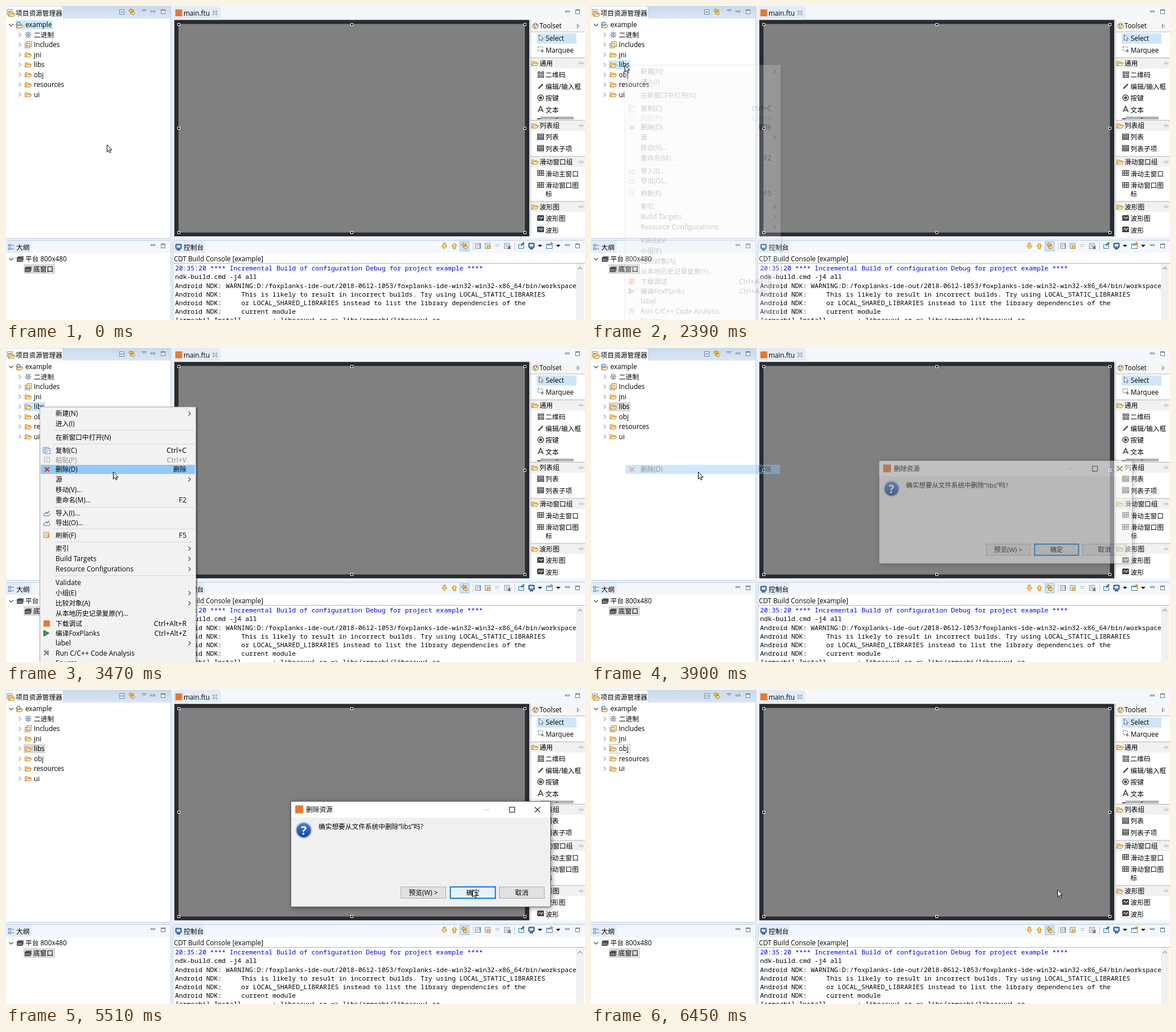
An HTML page that plays this animation: 1017x551 px, repeating every 7.32 s.

```html
<!DOCTYPE html>
<html lang="zh">
<head>
<meta charset="utf-8">
<style>
html, body { margin: 0; width: 100%; height: 100%; overflow: hidden; background: #e8eef8; }
svg { display: block; }
text { font: 11.7px 'Open Sans', 'Noto Sans CJK SC', 'Noto Sans CJK JP', 'Noto Sans CJK', sans-serif; white-space: pre; }
.mono { font: 11.42px 'Noto Sans Mono', 'DejaVu Sans Mono', monospace; }
.latin { font-size: 12px; }
.key { font-size: 12.3px; }
</style>
</head>
<body>
<script>
// Shape helpers; text is placed by its vertical centre
const text = (x, y, s, attrs = '') => `<text x="${x}" y="${y + 4.2}" ${attrs}>${s}</text>`;
const rect = (x, y, w, h, fill, attrs = '') => `<rect x="${x}" y="${y}" width="${w}" height="${h}" fill="${fill}" ${attrs}/>`;
const box = (x, y, w, h, line, fill = 'none', attrs = '') => rect(x + .5, y + .5, w - 1, h - 1, fill, `stroke="${line}" ${attrs}`);
const line = (d, color, attrs = '') => `<path d="${d}" fill="none" stroke="${color}" ${attrs}/>`;
const shape = (d, fill, attrs = '') => `<path d="${d}" fill="${fill}" ${attrs}/>`;
const group = (id, s, attrs = '') => `<g id="${id}" ${attrs}>${s}</g>`;
const at = (x, y, s) => `<g transform="translate(${x} ${y})">${s}</g>`;
const list = (items, draw) => items.map(i => draw(...i)).join('');

// Icons, drawn around their centre
const folder = (x, y) => at(x, y,
  shape('M-5.5 4V-3.5H-1.5L-.5-2H3.5V0H5.5L3.5 4Z', '#f6d58a', 'stroke="#c08a35"') +
  shape('M-5 4L-2.5 0H6L3.5 4Z', '#ffefbd', 'stroke="#c08a35"'));
const right = (x, y, c = '#a0a0a0') => line(`M${x - 1.5} ${y - 3.5}l3.5 3.5-3.5 3.5`, c, 'stroke-width="1.1"');
const down = (x, y) => line(`M${x - 3.5} ${y - 1.5}l3.5 3.5 3.5-3.5`, '#404040', 'stroke-width="1.2"');
const minimise = (x, y) => box(x - 4, y - 1, 8, 3, '#737b87', '#fff');
const maximise = (x, y) => box(x - 4, y - 4, 8, 8, '#737b87', '#fff') + rect(x - 4, y - 4, 8, 2, '#737b87');
const arrows = (x, y) => at(x, y,
  shape('M-5.5-2L-2-5.5V-3.5H3V-.5H-2V1.5Z', '#f4c75c', 'stroke="#b67b16"') +
  shape('M5.5 2.5L2-1V1H-2V4H2V6Z', '#fde5a0', 'stroke="#b67b16"'));
const arrow = (x, y, flip) => `<g transform="translate(${x} ${y}) scale(1 ${flip})">` +
  shape('M-2-5H2V0H4.5L0 5-4.5 0H-2Z', '#fbd76f', 'stroke="#bb8518"') + '</g>';
const monitor = (x, y) => box(x - 5, y - 5, 10, 8, '#24528e', '#cfe6fb', 'stroke-width="2" rx="1"') + rect(x - 3, y + 4, 6, 2, '#24528e');
const windows = (x, y) => rect(x - 4, y - 5, 10, 8, '#777') + box(x - 6, y - 3, 10, 8, '#444', '#777') + rect(x - 6, y - 3, 10, 2, '#333');
const sheet = (x, y, c = '#8b9099') => box(x - 5, y - 5, 10, 10, c, '#f5f6f8') + line(`M${x - 3} ${y - 1.5}h6m-6 3h4`, c);
const caret = (x, y) => shape(`M${x - 4} ${y - 2}h8l-4 4Z`, '#111');
const badge = (x, y, s) => rect(x - s / 2, y - s / 2, s, s, '#e8792f');
const cross = (x, y, r, c, w) => line(`M${x - r} ${y - r}l${2 * r} ${2 * r}m0-${2 * r}l-${2 * r} ${2 * r}`, c, `stroke-width="${w}"`);
const rows = (x, y) => box(x - 6, y - 5, 12, 11, '#444', '#ccc') + line(`M${x - 6} ${y - 2}h12m-12 3h12m-12 2.5h12`, '#444', 'stroke-width="1.4"');
const slides = (x, y) => box(x - 6, y - 5, 12, 10, '#444', '#ccc') + line(`M${x - 6} ${y}h12M${x - 2} ${y - 5}v10M${x + 2} ${y - 5}v10`, '#444', 'stroke-width="1.2"');
const wave = (x, y) => rect(x - 6, y - 5, 12, 10, '#444', 'rx="1.5"') + line(`M${x - 4} ${y + 1}l2.5-3 2.5 4 2-4 1.5 2`, '#fff');

const sidePanels = () =>
  box(-1, -1, 291, 409, '#c3d0e4', '#fff', 'rx="2"') + rect(0, 0, 289, 22, 'url(#active)') +
  shape('M0 0H95Q101 0 101 6V23H0Z', '#fafcff', 'stroke="#b9c8de"') + rect(0, 22, 289, 2, '#fff') +
  sheet(7, 11, '#b48a3c') + folder(10, 14) + text(17, 12.5, '项目资源管理器') +
  box(199, 6, 9, 9, '#5c87b8', '#e5f0fb') + line('M201 10.5h5', '#24528e') + arrows(221, 10) +
  line('M239 6.5h7l-3.5 3.5Z', '#737b87') + minimise(258, 9) + maximise(276, 10) +
  box(-1, 411, 291, 145, '#c3d0e4', '#fff', 'rx="2"') + rect(0, 412, 289, 21, '#f4f7fc') +
  shape('M0 412H39Q45 412 45 418V433H0Z', '#e3ecf8') +
  line('M4.5 418.5h4v3h-4Zm0 6h4v3h-4ZM10 420h4m-4 6h4', '#3c77b3') + text(18, 424, '大纲') +
  minimise(258, 419) + maximise(276, 421) +
  down(9, 444) + windows(25, 444) + text(34, 444, '平台 800x480') +
  rect(31, 453, 55, 17, '#d9d9d9') + windows(39, 462) + text(48, 462, '底窗口');

const editor = () =>
  rect(293, 0, 724, 408, '#f4f7fc') +
  shape('M295 0H371Q377 0 377 6V22H295Z', '#e3ecf8') + badge(303.5, 12, 12) + text(312, 12.5, 'main.ftu') +
  line('M363.5 8.5h1.5l2 2 2-2h1.5v1.5l-2 2 2 2v1.5h-1.5l-2-2-2 2h-1.5v-1.5l2-2-2-2Z', '#7d8794') +
  minimise(986, 9) + maximise(1004, 10) +
  rect(295.6, 24.4, 623.6, 379.8, '#282b2f') + rect(303, 31.5, 608.5, 366, '#808080') +
  [303, 607, 911].flatMap(x => [32, 214, 397].filter(y => x != 607 || y != 214)
    .map(y => box(x - 2, y - 2, 5, 5, '#fff', '#000'))).join('');

const header = (y, s) => rect(922, y - 10, 95, 19, '#f1f1f1') + rect(922, y - 10, 95, 1, '#b4b4b4') +
  folder(929, y) + text(937, y, s) + line(`M1009 ${y - 2.5}l-2.5 2.5 2.5 2.5m2.5-5l2.5 2.5-2.5 2.5M1008 ${y}h4.5`, '#aaa');

const toolPanel = () =>
  rect(921, 24, 96, 380, '#fff') + rect(921, 24, 1, 380, '#b9bfca') + rect(922, 24, 95, 21, '#f6f6f6') + rect(922, 45, 95, 1, '#bbb') +
  `<circle cx="930" cy="35" r="5" fill="#f0dfb7" stroke="#8f7650"/>` +
  rect(927, 32, 2, 2, '#d33') + rect(931, 32, 2, 2, '#36b') + rect(928, 36, 2, 2, '#393') +
  text(937, 35, 'Toolset') + line('M1003.5 31.5l4 3.5-4 3.5Z', '#777') +
  rect(932, 48, 70, 18, '#cde6fb') + shape('M936.5 50.5v10l2.5-2 2 3 1.5-1-1.5-3h3Z', '#fff', 'stroke="#567"') + text(948, 57, 'Select') +
  line('M934.5 71.5h8v7h-8Z', '#456', 'stroke-dasharray="2 2"') + line('M942 76v6m-3-3h6', '#456') + text(948, 78, 'Marquee') +
  header(100.5, '通用') +
  list([[934, 115], [940, 115], [934, 121], [940, 121]], (x, y) => box(x, y, 5, 5, '#444', '#aaa')) +
  line('M935 145l8-8', '#555', 'stroke-width="2.5"') +
  '<circle cx="939" cy="161" r="5" fill="none" stroke="#444" stroke-width="1.5"/><circle cx="939" cy="161" r="2.6" fill="#444"/>' +
  line('M934.5 186l4.5-10 4.5 10M936 183h6', '#444', 'stroke-width="1.7"') +
  list([[121, '二维码'], [141.5, '编辑/输入框'], [162, '按键'], [182.5, '文本']], (y, s) => text(947.5, y, s)) +
  rect(933, 197, 6, 2, '#555') + rect(939, 194, 58, 5, '#b2b2b2') + shape('M965 196h5l-2.5 2Z', '#444') +
  header(210, '列表组') + header(273.5, '滑动窗口组') + header(352.5, '波形图') +
  list([[rows, 230, '列表'], [rows, 250.5, '列表子项'], [slides, 294.5, '滑动主窗口'], [slides, 315, '滑动窗口图'],
    [wave, 373, '波形图'], [wave, 393.5, '波形']], (icon, y, s) => icon(939, Math.floor(y) - 1) + text(947.5, y, s)) +
  text(947.5, 330, '标');

const logLines = [
  'ndk-build.cmd -j4 all',
  'Android NDK: WARNING:D:/foxplanks-ide-out/2018-0612-1053/foxplanks-ide-win32-win32-x86_64/bin/workspace',
  'Android NDK:     This is likely to result in incorrect builds. Try using LOCAL_STATIC_LIBRARIES',
  'Android NDK:     or LOCAL_SHARED_LIBRARIES instead to list the library dependencies of the',
  'Android NDK:     current module',
  '[armeabi] Install        : libeasyui.so =&gt; libs/armeabi/libeasyui.so'];

const consolePanel = () =>
  box(293, 411, 726, 145, '#c3d0e4', '#fff', 'rx="2"') + rect(294, 412, 723, 21, '#f4f7fc') +
  shape('M294 412H343Q349 412 349 418V433H294Z', '#e3ecf8') + monitor(303, 423) + text(312, 424, '控制台') +
  arrow(770, 421, 1) + arrow(787.5, 421, -1) + box(797, 413, 17, 17, '#90c0ea', '#cde6fb') + arrows(805.5, 421) +
  rect(820, 414, 1, 15, '#c5c9d0') + sheet(829, 421) + rect(832, 416, 2, 10, '#6d91b9') + sheet(846, 421) + box(845, 421, 6, 5, '#b98619', '#fbd76f') +
  line('M859.5 418.5h8m-8 3h6', '#a8b4c4') + sheet(880, 421) + cross(884, 424, 2.5, '#555', 1.5) + rect(893, 414, 1, 15, '#c5c9d0') +
  box(900, 418, 10, 8, '#4a78ab', '#e5f0fb') + line('M905 420l5-5', '#2b8651', 'stroke-width="3"') + monitor(923, 421) + caret(938, 421) +
  box(949, 417, 11, 9, '#4a78ab', '#fff') + rect(949, 417, 11, 3, '#6d9bcf') + line('M958 414v6m-3-3h6', '#d69b22', 'stroke-width="2"') + caret(970, 421) +
  minimise(986, 419) + maximise(1004, 421) +
  text(295, 443.5, 'CDT Build Console [example]') + rect(294, 451, 723, 1, '#aeb4bd') +
  '<g clip-path="url(#log)">' +
  text(297, 460, '20:35:20 **** Incremental Build of configuration Debug for project example ****', 'class="mono" fill="#00f"') +
  logLines.map((s, i) => text(297, 475.2 + 15.2 * i, s, 'class="mono"')).join('') + '</g>' +
  rect(1001, 452, 14, 99, '#f0f0f0') + line('M1004.5 462l3.5-3.5 3.5 3.5', '#999', 'stroke-width="1.3"');

const node = (y, s) => right(24, y) + folder(39, y) + text(49, y, s);
const tree = () =>
  group('rootSel', rect(17, 25, 65, 16, '#cce8ff')) + rect(31, 95, 38, 16, '#cce8ff', 'id="libsSel"') +
  down(9, 33) + folder(24, 34) + box(19, 28, 6, 6, '#3c77b3', '#d8eafb') + text(34, 33, 'example') +
  right(24, 50.5) + line('M39 45v11m-5.5-5.5h11M35 46.5l8 8m0-8l-8 8', '#667c92', 'stroke-width="1.7" stroke-dasharray="3 1"') + text(49, 50.5, '二进制') +
  right(24, 68) + box(36, 62, 9, 10, '#a98643', '#fff5d7') + box(33, 65, 9, 9, '#a98643', '#fff5d7') + line('M36 67v5m0-2h3v2', '#666') + text(49, 68, 'Includes') +
  node(85.5, 'jni') + group('libs', node(103, 'libs')) +
  group('rest', node(120.5, 'obj') + node(138, 'resources') + node(155.5, 'ui')) +
  group('focus', box(32, 95, 37, 16, '#777', 'none', 'stroke-dasharray="1 1"'));

// [centre, label, shortcut]; '>' marks a submenu
const deletion = [213, '删除(D)', '删除'];
const entries = [[115, '新建(N)', '>'], [133, '进入(I)'], [157, '在新窗口中打开(N)'], [180, '复制(C)', 'Ctrl+C'],
  [196.5, '粘贴(P)', 'Ctrl+V'], deletion, [230.5, '源', '>'], [249, '移动(V)...'], [267, '重命名(M)...', 'F2'],
  [290, '导入(I)...'], [307, '导出(O)...'], [328.5, '刷新(F)', 'F5'], [352, '索引', '>'], [370, 'Build Targets', '>'],
  [388, 'Resource Configurations', '>'], [411.5, 'Validate'], [430, '小组(E)', '>'], [448, '比较对象(A)', '>'],
  [466, '从本地历史记录复原(Y)...'], [484, '下载调试', 'Ctrl+Alt+R'], [500.5, '编译FoxPlanks', 'Ctrl+Alt+Z'],
  [518, 'label', '>'], [535.5, 'Run C/C++ Code Analysis'], [553, 'Source']];
const entry = (y, s, key) => {
  const fill = `fill="${s[0] == '粘' ? '#8d8d8d' : '#000'}"`;
  const keyClass = /\w/.test(key) ? 'class="key"' : '';
  return text(87, y, s, fill + (/^\w/.test(s) ? ' class="latin"' : '')) + (key == '>' ? right(322, y, '#444') :
    key ? text(317, y, key, `${fill} ${keyClass} text-anchor="end"`) : '');
};
const deleteIcon = cross(72, 213, 3.7, '#d9402b', 2.6);
const port = y => line(`M66.5 ${y}v4.5h10v-4.5`, '#5e87b5') + line(`M68 ${y + 1}l3-3 2 2 3-4`, '#5e87b5', 'stroke-width="1.5"');
const menu = () =>
  box(59, 103, 275, 470, '#a7a7a7', '#f2f2f2', 'filter="url(#menuShadow)"') +
  rect(61, 205, 271, 16, '#91c9f7', 'id="hover"') +
  [144, 168, 279, 317, 340, 399].map(y => rect(85, y, 246, 1, '#d7d7d7')).join('') +
  list(entries, entry) + deleteIcon +
  sheet(70, 179, '#6d91b9') + sheet(73, 181, '#6d91b9') + sheet(72, 196, '#b5b5b5') + port(290) + port(307) +
  sheet(71, 328, '#b48a3c') + line('M70 333q5 0 4-6', '#e0a030', 'stroke-width="2"') + badge(71.5, 483.5, 11) +
  shape('M66.5 495.5l9 5-9 5Z', '#37a447', 'stroke="#333"') + cross(71, 535, 4, '#4a78ab', 1.8) + line('M69 531l6 4-8 2', '#d98b2b', 'stroke-width="1.6"');

const button = (x, s, id) => group(id, box(x, 345, 80, 21, '#adadad', '#e1e1e1') + text(x + 40, 356, s, 'text-anchor="middle"'));
const dialog = () =>
  box(500, 195, 457, 186, '#666', '#f0f0f0', 'filter="url(#shadow)"') + rect(501, 196, 455, 28, '#fff') +
  badge(515, 209.5, 14) + text(527, 210, '删除资源') +
  line('M840 210h9', '#c4c4c4') + box(884, 205, 10, 10, '#111') + cross(933.5, 210, 4.7, '#111', 1.1) +
  '<circle cx="523" cy="246" r="13.5" fill="url(#ask)" stroke="#b9c3d2" stroke-width="2"/>' +
  text(523, 247, '?', 'fill="#fff" text-anchor="middle" style="font-size:21px;font-weight:700" dy="3"') +
  text(549, 240, '确实想要从文件系统中删除“libs”吗?') +
  button(693, '预览(W) &gt;', 'preview') + button(780, '确定', 'ok') + button(866, '取消', 'cancel');

const gradient = (id, from, to) => `<linearGradient id="${id}" x2="0" y2="1"><stop stop-color="${from}"/><stop offset="1" stop-color="${to}"/></linearGradient>`;
const shadow = (id, d, blur, o) => `<filter id="${id}" x="-10%" y="-10%" width="120%" height="130%"><feDropShadow dx="${d}" dy="${d}" stdDeviation="${blur}" flood-opacity="${o}"/></filter>`;
document.body.innerHTML = '<svg width="1017" height="551"><defs>' +
  gradient('active', '#c9d9ed', '#dae6f5') + gradient('ask', '#4c83d6', '#123f96') +
  shadow('menuShadow', 2, 1.5, .45) + shadow('shadow', 2, 5, .4) +
  '<clipPath id="log"><rect x="294" y="452" width="707" height="99"/></clipPath></defs>' +
  sidePanels() + editor() + toolPanel() + consolePanel() + tree() +
  group('menu', menu()) + group('flash', rect(61, 205, 271, 16, '#91c9f7') + entry(...deletion) + deleteIcon) + group('dialog', dialog()) +
  group('cursor', shape('M.5.5V13L3.3 10.4 5.2 14.6 7.2 13.7 5.3 9.6H9Z', '#fff', 'stroke="#000"')) + '</svg>';

const $ = id => document.getElementById(id);
const show = (id, opacity) => {
  $(id).setAttribute('opacity', opacity);
  $(id).style.display = opacity > 0 ? '' : 'none';
};
const clamp = v => Math.max(0, Math.min(1, v));

// Pointer tip: [time, x, y]
const path = [[430, 177, 243], [1140, 61, 105], [1210, 61, 105], [1330, 59, 103], [2840, 59, 103], [3330, 187, 216],
  [3469, 187, 216], [3470, 188, 217], [3930, 188, 217], [4480, 764, 280], [4740, 804, 338], [5260, 818, 349], [5509, 818, 349], [5510, 819, 350]];
function pointer(t) {
  const i = path.findIndex(k => k[0] > t);
  if (i < 0) return path[path.length - 1].slice(1);
  if (!i) return path[0].slice(1);
  const [t0, x0, y0] = path[i - 1], [t1, x1, y1] = path[i];
  let p = (t - t0) / (t1 - t0);
  if (Math.hypot(x1 - x0, y1 - y0) > 100) p *= p * (3 - 2 * p);
  return [Math.round(x0 + (x1 - x0) * p), Math.round(y0 + (y1 - y0) * p)];
}

function paintButton(id, fill, edge, color, width = 1) {
  const [face, label] = $(id).children;
  face.setAttribute('fill', fill);
  face.setAttribute('stroke', edge);
  face.setAttribute('stroke-width', width);
  label.setAttribute('fill', color);
}

function draw(t) {
  const [x, y] = pointer(t);
  $('cursor').setAttribute('transform', `translate(${x} ${y})`);

  const removed = t >= 6080, modal = t >= 3780;
  show('rootSel', t < 1210 ? 1 : 0);
  show('libs', removed ? 0 : 1);
  show('libsSel', !removed && (t >= 1210 || x < 69 && y < 111) ? 1 : 0);
  $('libsSel').setAttribute('fill', t < 1210 ? '#e5f3ff' : modal ? '#d9d9d9' : '#cce8ff');
  $('rest').setAttribute('transform', `translate(0 ${removed ? -17.5 : 0})`);
  show('focus', t >= 6450 ? 1 : 0);

  show('menu', t < 2390 || modal ? 0 : clamp((t - 2340) / 250));
  const hit = entries.find(e => Math.abs(e[0] - y) < 9);
  show('hover', x > 62 && hit ? 1 : 0);
  if (hit) $('hover').setAttribute('y', Math.round(hit[0] - 8));
  show('flash', modal ? clamp((4000 - t) / 230) : 0);

  const closing = t > 6250;
  const p = closing ? clamp((6440 - t) / 190) : clamp((t - 3800) / 200);
  show('dialog', p);
  $('dialog').setAttribute('transform', `translate(728.5 288) scale(${.952 + .048 * p}) translate(-728.5 -288)`);
  const off = ['#ccc', '#bfbfbf', '#838383'], on = ['#e1e1e1', '#adadad', '#000'];
  for (const id of ['preview', 'cancel']) paintButton(id, ...(t >= 6000 ? off : on));
  if (t >= 6000) paintButton('ok', ...off);
  else paintButton('ok', t >= 5940 ? '#cce4f7' : x >= 780 && y >= 345 ? '#e5f1fb' : '#e1e1e1', '#0078d7', '#000', 2);
}

const start = performance.now();
function tick() {
  draw((performance.now() - start) % 7320);
  requestAnimationFrame(tick);
}
tick();
</script>
</body>
</html>
```
